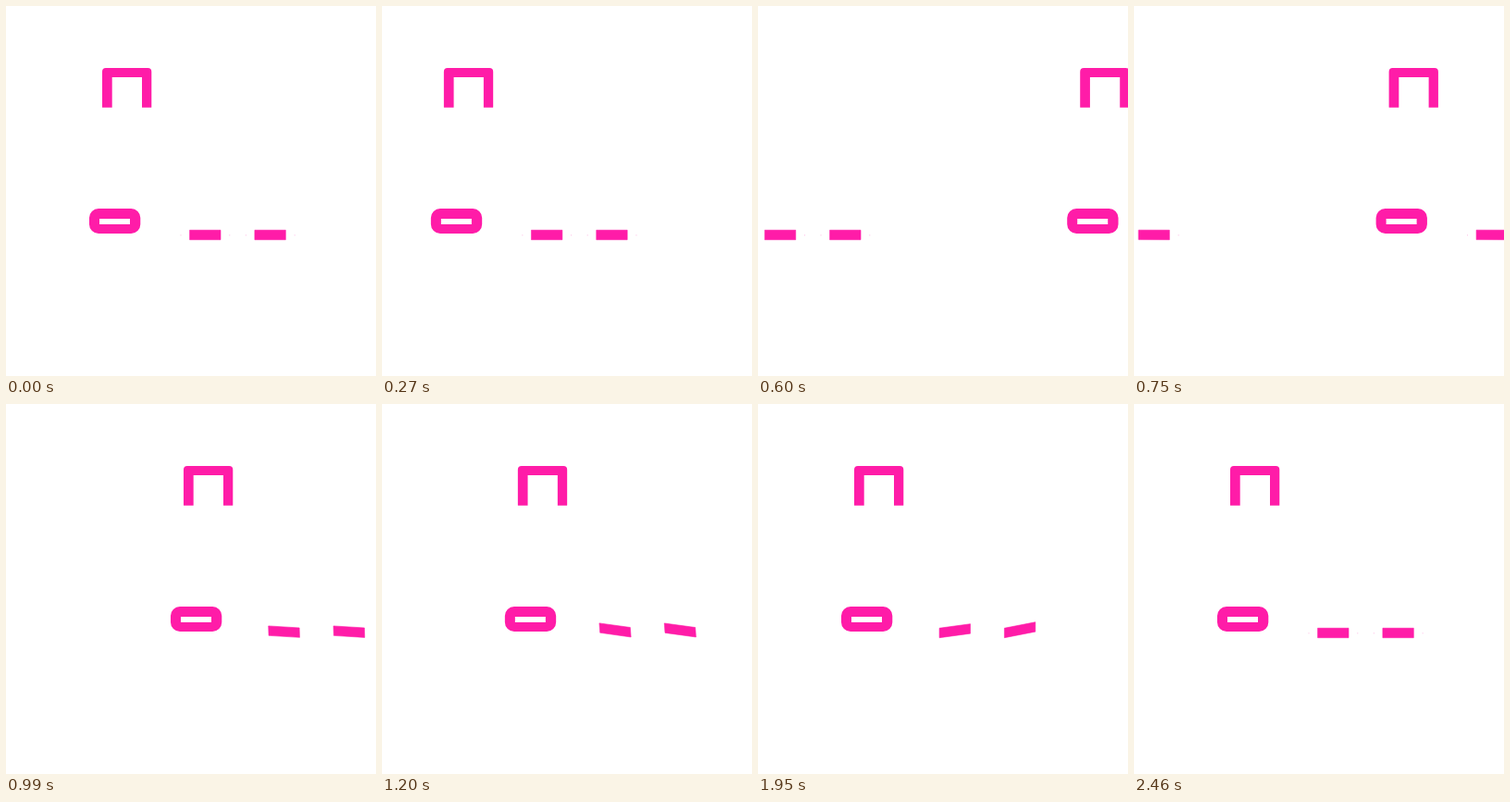
These frames come from a looping animation (400 px wide and 400 px high, 2.49 s). An HTML page with a canvas:

```html
<!DOCTYPE html>
<html lang="en">
<head>
<meta charset="utf-8">
<title>Sliding figure</title>
<style>
  html, body { margin: 0; width: 100%; height: 100%; overflow: hidden; background: #fff; }
  canvas { display: block; }
</style>
</head>
<body>
<canvas id="stage" width="400" height="400"></canvas>
<script>
const ctx = document.getElementById('stage').getContext('2d');
const LOOP = 2490, SLIDE = 1800, TILE = 435.5, PINK = '#ff1ca8';

// Ease with the shape of cubic-bezier(.333, 0, .3, 1), solved by bisection
function slideEase(x) {
  if (x >= 1) return 1;
  let lo = 0, hi = 1;
  for (let i = 0; i < 24; i++) {
    const s = (lo + hi) / 2, r = 1 - s;
    if (s * r * r + 0.9 * s * s * r + s ** 3 < x) lo = s; else hi = s;
  }
  return lo * lo * (3 - 2 * lo);
}

// Sine-eased track through [time, value] keys
function track(t, keys) {
  if (t <= keys[0][0]) return keys[0][1];
  for (let i = 1; i < keys.length; i++) {
    const [t0, a] = keys[i - 1], [t1, b] = keys[i];
    if (t < t1) return a + (b - a) * (1 - Math.cos(Math.PI * (t - t0) / (t1 - t0))) / 2;
  }
  return keys[keys.length - 1][1];
}

const swing = (t, peak, mid, end = 0) => track(t, [[700, 0], [1440, peak], [1930, mid], [2300, end]]);

function drawArch() {
  ctx.beginPath();
  ctx.roundRect(104, 67, 53.3, 42.7, [4, 4, 0.5, 0.5]);
  ctx.rect(114.7, 77, 32.3, 32.7);
  ctx.fill('evenodd');
}

function drawRing() {
  ctx.beginPath();
  ctx.roundRect(90, 219, 55.3, 27, 10);
  ctx.rect(101, 230, 33, 6);
  ctx.fill('evenodd');
}

// tilt > 0 raises the left end, tilt < 0 the right end
function drawFoot(x, tilt) {
  const left = Math.max(tilt, 0), right = Math.max(-tilt, 0);
  const lift = left * 0.16, lean = left / 6;
  const top = 242.3 - lift, bottom = 252.7 - lift, w = 33.4;
  ctx.beginPath();
  ctx.moveTo(x, top - left);
  ctx.lineTo(x + w, top - right);
  ctx.lineTo(x + w + lean, bottom - right);
  ctx.lineTo(x + lean, bottom - left);
  ctx.closePath();
  ctx.fill();
  ctx.stroke();
  if (Math.abs(tilt) < 0.3) {
    ctx.globalAlpha = 0.25;
    ctx.fillRect(x - 10, 247, 0.8, 1.5);
    ctx.fillRect(x + 42.8, 247, 0.8, 1.5);
    ctx.globalAlpha = 1;
  }
}

function draw(t) {
  ctx.fillStyle = '#fff';
  ctx.fillRect(0, 0, 400, 400);
  ctx.fillStyle = ctx.strokeStyle = PINK;
  ctx.lineWidth = 0.6;
  ctx.lineJoin = 'round';
  const offset = TILE * slideEase(t / SLIDE);
  const shift = swing(t, -8.5, -2.5);
  for (const x of [-offset, TILE - offset]) {
    ctx.save();
    ctx.translate(x, 0);
    drawArch();
    drawRing();
    drawFoot(198.6 + shift, swing(t, 6.1, -4.6));
    drawFoot(268.9 + shift, swing(t, 6, -6.6));
    ctx.restore();
  }
}

const start = performance.now();
function tick(now) {
  draw(Math.max(0, now - start) % LOOP);
  requestAnimationFrame(tick);
}
draw(0);
requestAnimationFrame(tick);
</script>
</body>
</html>
```
